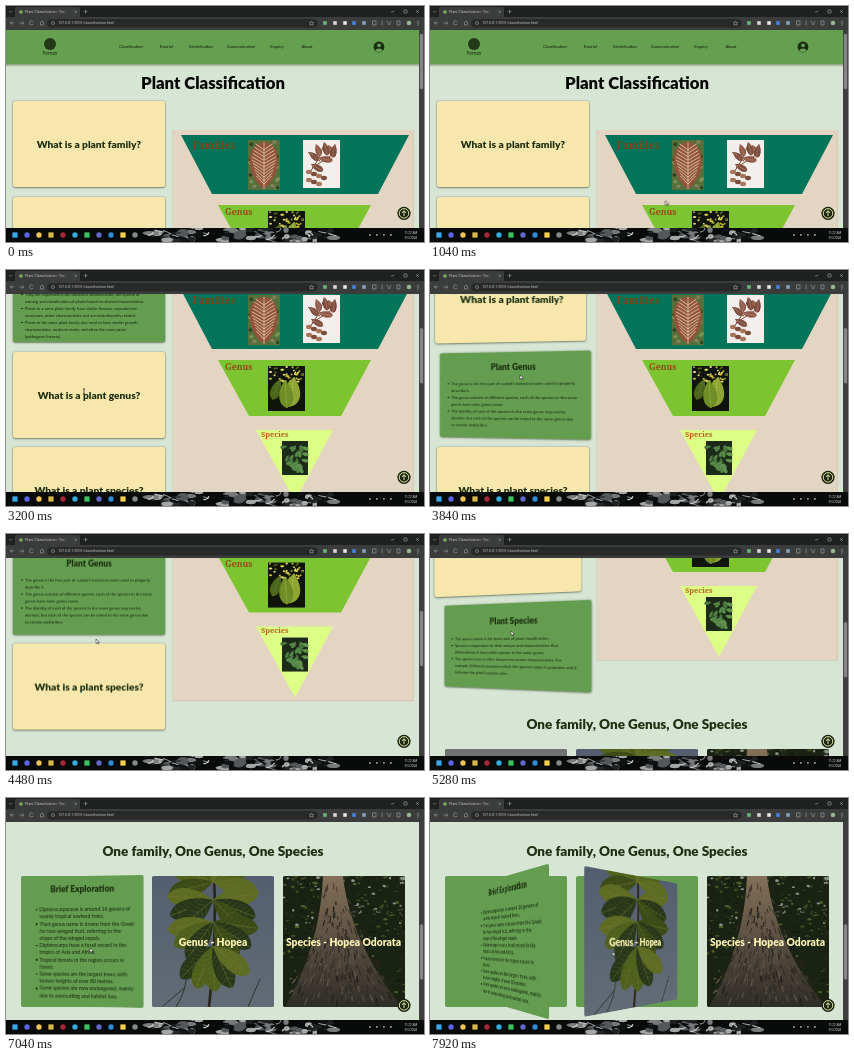
An HTML page that plays this animation: 418 by 236 pixels, repeating every 8000 ms.

```html
<!DOCTYPE html>
<html lang="en">
<head>
<meta charset="utf-8">
<title>Plant Classification</title>
<style>
html, body { margin: 0; width: 100%; height: 100%; overflow: hidden; background: #111; }
#stage { position: relative; width: 418px; height: 236px; overflow: hidden; font-family: Lato, sans-serif; color: #1d3010; }
#stage > svg, #page > svg { position: absolute; left: 0; top: 0; }
#view { position: absolute; left: 0; top: 24px; width: 413px; height: 198px; overflow: hidden; background: #d7e5d4; }
#page { position: absolute; left: 0; top: -24px; width: 413px; height: 720px; }
h1, h2, h3, ul { margin: 0; padding: 0; }
h1, h2 { position: absolute; left: 0; width: 414px; text-align: center; line-height: 20px; white-space: nowrap; font-weight: 900; }
h1 { top: 67px; font-size: 16.7px; color: #050805; }
h2 { top: 397px; font-size: 13.5px; color: #1d3010; }
.card { position: absolute; }
.flip { position: absolute; inset: 0; transform-style: preserve-3d; }
.face { position: absolute; inset: 0; backface-visibility: hidden; border-radius: 2px; overflow: hidden;
  display: flex; flex-direction: column; justify-content: center; align-items: center; white-space: nowrap; }
.back { transform: rotateY(180deg); background: #649d50; }
.info { width: 152px; height: 86px; left: 7px; }
.info .face { box-shadow: 0 .5px 2px #3c4a2c; }
.info .front { background: #f7e7ad; font-weight: 900; font-size: 10.2px; }
.photo { width: 122px; height: 131px; top: 432px; border-radius: 2px; background: #649d50; }
.photo .front svg { position: absolute; inset: 0; }
.photo b { position: relative; font-size: 10.3px; font-weight: 900; color: #fdf5b4; }
h3 { font-size: 8.4px; line-height: 12px; font-weight: 900; margin-bottom: 7.5px; }
ul { align-self: stretch; margin-left: 12px; list-style: none; font-size: 4.1px; line-height: 7px; color: #13250b; }
li { position: relative; }
li::before { content: ""; position: absolute; left: -3.6px; top: 2.8px; width: 1.4px; height: 1.4px; border-radius: 50%; background: #13250b; }
.photo ul { margin-left: 18px; font-size: 5.1px; line-height: 7.2px; }
.photo h3 { font-size: 8.4px; margin-bottom: 11px; }
.slab { font: 900 10px "Noto Serif", serif; }
.ui { font-family: Roboto, sans-serif; }
</style>
</head>
<body>
<div id="stage">
  <div id="view"><div id="page">
    <svg width="413" height="720">
      <defs><linearGradient id="shade" x2="0" y2="1"><stop stop-color="#8b9a80"/><stop offset="1" stop-color="#d7e5d4"/></linearGradient></defs>
      <path fill="#659f50" d="M0 24H413V58H0z"/>
      <path fill="url(#shade)" d="M0 58H413V61H0z"/>
      <circle cx="44" cy="38" r="6" fill="#233a18"/>
      <text x="44" y="49" text-anchor="middle" font-size="5" fill="#1a2c12">Fernzo</text>
      <g id="nav" font-size="4.1" text-anchor="middle" fill="#0f1c0a"></g>
      <circle cx="373" cy="41" r="5.4" fill="#1a2b14"/>
      <circle cx="373" cy="39.3" r="1.9" fill="#659f50"/>
      <path fill="#659f50" d="M369.3 44.8a3.8 3 0 0 1 7.4 0a5.4 5.4 0 0 1-7.4 0z"/>
      <path fill="#c9bfac" d="M166.6 124H407.8V343.6H166.6z"/>
      <path fill="#e3d5c1" d="M167 124H407.4V343H167z"/>
      <path fill="#01745a" d="M175 129H403L372 188H206z"/>
      <path fill="#7cc530" d="M212 199H365L335 255H243z"/>
      <path fill="#ddff86" d="M250 269H327L289 340z"/>
      <g class="slab">
        <text x="186.5" y="143" fill="#784516">Families</text>
        <text x="219" y="209" style="font-size:8.7px" fill="#93491a">Genus</text>
        <text x="255" y="275.7" style="font-size:7.4px" fill="#b85c20">Species</text>
      </g>
      <g id="plants"></g>
    </svg>
    <h1>Plant Classification</h1>
    <h2>One family, One Genus, One Species</h2>
  </div></div>
  <svg id="chrome" width="418" height="236" class="ui">
    <defs><clipPath id="band"><path d="M128 222H336V236H128z"/></clipPath></defs>
    <path fill="#3f3f3f" d="M413 24h5v198h-5z"/>
    <rect id="thumb" x="413.8" y="28" width="3.4" height="55" rx="1" fill="#858585"/>
    <circle cx="398" cy="207.3" r="6.6" fill="#17230f"/>
    <circle cx="398" cy="207.3" r="4.7" fill="none" stroke="#e9e7a4"/>
    <path d="M398 210v-5.2m-2.2 2.2l2.2-2.3l2.2 2.3" fill="none" stroke="#e9e7a4"/>
    <path fill="#1f2020" d="M0 0H418V12H0z"/>
    <path fill="#3b3c3c" d="M0 11H418V24H0zM9 11V3q0-2 2-2H72q2 0 2 2V11z"/>
    <rect x="41" y="13" width="271" height="8.6" rx="4.3" fill="#282929"/>
    <circle cx="15" cy="6" r="1.7" fill="#78b35d"/>
    <g font-size="3.7" fill="#c4c4c4">
      <text x="19" y="7.3">Plant Classification - Fer</text>
      <text x="52" y="18.4">127.0.0.1:5501/classification.html</text>
    </g>
    <g fill="none" stroke="#b4b4b4" stroke-width=".5">
      <path d="M3 5l1.5 1.5L6 5M68.5 4.5l2.5 2.5m0-2.5l-2.5 2.5M79.5 3.7v4m-2-2h4M385 5.7h3.2M398 4h3v3h-3zM410 4l3 3m0-3l-3 3"/>
      <path d="M8.2 17H4.5m1.7-1.8L4.3 17l1.9 1.8M13.5 17h4m-1.7-1.8l1.9 1.8l-1.9 1.8M27 15.6a2 2 0 1 0 .2 2.3M34 17l2-2l2 2m-3.4 0v2h2.8v-2M376 14.5v5"/>
      <circle cx="47" cy="17" r="1.5"/>
      <path d="M305.5 15l.7 1.5l1.5.1l-1.1 1l.4 1.6l-1.5-.8l-1.5.8l.4-1.6l-1.1-1l1.5-.1z"/>
      <path d="M391 15v4h3v-4zM366.5 15h3.5v4h-3.5zM381 15l2 4l2-4"/>
    </g>
    <path fill="#b4b4b4" d="M411.5 15h1v1h-1zm0 1.7h1v1h-1zm0 1.7h1v1h-1z"/>
    <path fill="#090b0b" d="M0 222H418V236H0z"/>
    <g clip-path="url(#band)"><g id="marble" style="filter:blur(.7px)"></g></g>
    <g id="icons"></g>
    <g font-size="3" fill="#dadada" text-anchor="end">
      <text x="411" y="227.6">11:22 AM</text><text x="411" y="232.6">3/5/2024</text>
    </g>
    <g id="mouse">
      <path id="arrow" d="M0 0v4.4l1.1-1l.7 1.6l.8-.4l-.7-1.5h1.5z" fill="#fff" stroke="#111" stroke-width=".5"/>
      <path id="beam" d="M-1-2h2M0-2v5M-1 3h2" fill="none" stroke="#111" stroke-width=".7"/>
    </g>
  </svg>
</div>
<script>
const LOOP = 8000;
const $ = id => document.getElementById(id);

let seed = 11;
const rnd = (a, b) => {
  seed = (seed * 16807) % 2147483647;
  return a + (b - a) * seed / 2147483647;
};
const repeat = (n, make) => Array.from({ length: n }, (_, i) => make(i)).join("");
const pick = list => list[Math.floor(rnd(0, list.length))];
const blob = (x, y, rx, ry, fill) => `<ellipse cx="${x}" cy="${y}" rx="${rx}" ry="${ry}" fill="${fill}"/>`;
const box = (x, y, w, h, fill) => `<rect x="${x}" y="${y}" width="${w}" height="${h}" fill="${fill}"/>`;
const line = (d, stroke, w) => `<path d="${d}" fill="none" stroke="${stroke}" stroke-width="${w}"/>`;
const fade = (id, top, low) => `<linearGradient id="${id}" x2="0" y2="1"><stop stop-color="${top}"/><stop offset="1" stop-color="${low}"/></linearGradient>`;
// Leaves are widest towards the tip
const leaf = (x, y, len, wide, turn, fill, vein) =>
  `<g transform="translate(${x} ${y}) rotate(${turn})"><path d="M0 0C${len * .35} ${-wide} ${len * .85} ${-wide * 1.3} ${len} 0C${len * .85} ${wide * 1.3} ${len * .35} ${wide} 0 0z" fill="${fill}"/>` +
  line(`M0 0H${len}`, vein, .5) +
  repeat(6, i => line(`M${len * (.2 + i * .11)} 0l${len * .1} ${-wide * .6}m0 ${wide * 1.2}l${-len * .1} ${-wide * .6}`, vein, .25)) + "</g>";

// Navigation and pictures in the pyramid
$("nav").innerHTML = [["Classification", 125], ["Tutorial", 160], ["Identification", 195], ["Communication", 235], ["Enquiry", 271], ["About", 301]]
  .map(([s, x]) => `<text x="${x}" y="42.4">${s}</text>`).join("");

const familyLeaf = box(242, 134, 32, 50, "#55703a") +
  repeat(40, () => blob(rnd(244, 272), rnd(136, 182), 2, 1.8, pick(["#3c5a27", "#7c9255", "#8a8060", "#2f4420"]))) +
  `<path d="M257 136C268 135 274 148 271 162Q268 176 258 183Q248 177 245 163C241 149 247 137 257 136z" fill="#94543c"/>` +
  repeat(11, i => {
    const w = 12.5 - Math.abs(i - 4.5) * .9;
    return line(`M${258 - w} ${138 + i * 3.2}L258 ${144 + i * 3.4}L${258 + w} ${138 + i * 3.2}`, "#dcc8a8", .9);
  }) +
  line("M258 136V183", "#e6cfae", .7);
const sketch = box(297, 134, 37, 48, "#f2eeec") +
  line("M302 168Q313 156 318 138M306 162L330 146M314 155L302 146", "#75432f", 1) +
  [[318, 136, 14, 75], [322, 139, 14, 60], [329, 138, 14, 100], [310, 138, 13, 70], [303, 146, 13, 40], [312, 152, 15, 10], [305, 158, 14, 30]]
    .map(([x, y, n, a], i) => leaf(x, y, n, 3.6, a, i % 2 ? "#8a5240" : "#734334", "#b58a76")).join("") +
  repeat(7, i => blob(303 + i % 4 * 5, 166 + i * 2, 3, 2.2, i % 2 ? "#7d4d3b" : "#a6765c"));
const genusLeaf = box(262, 205, 37, 45, "#10130a") +
  repeat(45, () => blob(rnd(264, 297), rnd(206, 221), rnd(.7, 1.8), 1, pick(["#d6c93b", "#a3a52c", "#e8df69", "#596b19"]))) +
  leaf(274, 218, 22, 6, 110, "#46611a", "#6b8430") + leaf(288, 216, 30, 10, 98, "#8ba431", "#b4c054") + leaf(279, 219, 28, 8, 86, "#6d8b24", "#a2b548");
const speciesLeaf = box(276, 280, 26, 34, "#1c2b19") +
  repeat(26, () => leaf(rnd(281, 297), rnd(283, 307), 7, 2.2, rnd(0, 180), pick(["#3f7038", "#598b46", "#2f562d", "#477b3c"]), "#6f9d5c"));
$("plants").innerHTML = familyLeaf + sketch + genusLeaf + speciesLeaf;

// Taskbar
$("marble").innerHTML =
  repeat(75, i => {
    const x = i % 3 ? rnd(215, 330) : rnd(130, 195);
    return blob(x, rnd(222, 236), rnd(2, 8), rnd(1, 4), pick(["#a3a5a6", "#55585a", "#101213", "#1f2223", "#77797a"]));
  }) +
  repeat(26, () => line(`M${rnd(132, 325)} ${rnd(222, 234)}q4 1 ${rnd(3, 10)} ${rnd(-6, 6)}`, pick(["#0a0c0d", "#c4c6c6"]), rnd(.6, 1.6)));
$("icons").innerHTML =
  ["#3aa9ee", "#5965e8", "#f4c552", "#d9b94a", "#a52733", "#34a8df", "#3bc45c", "#6268c5", "#2d8cd6", "#f3d24c", "#85888a"]
    .map((c, i) => i % 3 ? blob(9 + i * 12, 229, 2.7, 2.7, c) : box(6.4 + i * 12, 226.4, 5.2, 5.2, c)).join("") +
  repeat(4, i => box(363 + i * 7, 228, 1.8, 1.8, "#8f9293"));
$("chrome").insertAdjacentHTML("beforeend",
  [[319, "#67b67c"], [329, "#d9d9d9"], [339, "#e6e6e6"], [348, "#4b83df"], [358, "#8aa3bb"]].map(([x, c]) => box(x - 1.8, 15.2, 3.6, 3.6, c)).join("") +
  blob(403, 17, 2.3, 2.3, "#9bb38c"));
$("chrome").append($("mouse"));

// Large photographs, each 122 by 131
const greens = ["#27341a", "#343f1f", "#1e2716", "#434a29", "#2e3b1b"];
const crown = (n, x, y, w, h) => repeat(n, () => {
  const a = rnd(0, 6.283), r = Math.sqrt(rnd(0, 1));
  return blob(x + w * r * Math.cos(a), y + h * r * Math.sin(a), rnd(1, 3), rnd(.7, 1.8), pick(greens));
});
const tree = fade("dusk", "#717274", "#7b7874") + box(0, 0, 122, 131, "url(#dusk)") + box(0, 112, 122, 19, "#5d513d") +
  repeat(40, () => blob(rnd(0, 122), rnd(98, 111), rnd(3, 8), rnd(2, 4), pick(greens))) +
  repeat(24, () => blob(rnd(0, 122), rnd(114, 130), rnd(6, 18), .8, pick(["#6b5d45", "#4e4535", "#625641"]))) +
  `<path d="M54 118Q58 100 57 72L24 46L26 45L58 64L58 28H62L63 60L92 40L93 42L67 70Q67 102 72 118z" fill="#38342c"/>` +
  crown(150, 58, 24, 32, 15) + crown(150, 32, 38, 28, 12) + crown(150, 84, 38, 24, 13) + crown(40, 22, 52, 15, 6);
const hopea = fade("slate", "#535f70", "#626c76") + box(0, 0, 122, 131, "url(#slate)") +
  line("M62 0Q65 60 57 131", "#2a261a", 2.6) + line("M24 131Q36 112 34 96M10 131L32 112M96 131L108 103", "#2c3329", 1) +
  [[6, [200, 165, -25, 12, 250, 285]], [24, [185, 160, 140, -8, 22, 45]], [46, [170, 148, 125, 8, 34, 58]], [70, [135, 112, 88, 66, 38]]]
    .map(([y, turns]) => turns.map((a, i) => leaf(61, y, 46, 11, a, pick(["#3b4a17", "#4f601d", "#28361a", "#5e6c23"]), "#727c35")).join("")).join("");
const trunk = box(0, 0, 122, 131, "#1a2214") + fade("wood", "#857059", "#2f2d28") +
  repeat(420, () => {
    const y = Math.pow(rnd(0, 1), 1.4) * 125;
    return blob(rnd(0, 122), y, rnd(.6, 2.6), rnd(.5, 1.5), pick(["#22301a", "#3a4a22", "#131b10", "#4c5a2b", y < 50 ? "#8b938a" : "#1c2716"]));
  }) +
  `<path d="M40 0H60C64 40 84 88 119 131H2C24 92 38 50 40 0z" fill="url(#wood)"/>` +
  repeat(300, () => {
    const v = Math.sqrt(rnd(0, 1)), u = rnd(-1, 1), half = 10 + 48 * Math.pow(v, 1.3);
    const x = 50 + 10 * v + u * half * .96, y = v * 124;
    return line(`M${x} ${y}l${u * 3.5} ${rnd(3, 8)}`, pick(["#26231f", "#35312b", "#5e564a", "#211f1c"]), rnd(.4, 1.3));
  });

// Cards
const list = items => "<ul>" + items.map(s => `<li>${s.replaceAll("|", "<br>")}</li>`).join("") + "</ul>";
function card(kind, pos, front, title, items) {
  const el = document.createElement("div");
  el.className = "card " + kind;
  el.style.cssText = pos;
  el.innerHTML = `<div class="flip"><div class="face front">${front}</div><div class="face back"><h3>${title}</h3>${list(items)}</div></div>`;
  $("page").append(el);
  return el.firstChild;
}
const photo = (x, art, label, title, items) =>
  card("photo", `left:${x}px`, `<svg width="122" height="131">${art}</svg><b>${label}</b>`, title, items);

const family = card("info", "top:95px", "What is a plant family?", "Plant Family", [
  "Plant families is an essential and basic unit/taxonomic classification in|the plant kingdom.",
  "They are important in the botanical nomenclature, the system of|naming and classification of plants based on shared characteristics.",
  "Plants in a same plant family have similar flowers, reproductive|structures, other characteristics and are evolutionarily related.",
  "Plants in the same plant family also tend to have similar growth|characteristics, nutrient needs, and often the same pests|(pathogens/insects)."]);
const genus = card("info", "top:191px", "What is a plant genus?", "Plant Genus", [
  "The genus is the first part of a plant's botanical name used to properly|describe it.",
  "The genus consists of different species, each of the species in the same|genus have same genus name.",
  "The identity of each of the species in the same genus may not be|obvious, but each of the species can be noted to the same genus due|to certain similarities."]);
const species = card("info", "top:286px", "What is a plant species?", "Plant Species", [
  "The species name is the basic unit of plant classification.",
  "Species is dependent on their unique and characteristics that|differentiates it from other species in the same genus.",
  "The species term is often known for certain characteristics. For|example, <i>Echinacea purpurea</i> which the species name is purpurea and it|indicates the plant's purple color."]);
const photoA = photo(15, tree, "Family - Dipterocarpaceae", "Brief Exploration", [
  "Dipterocarpaceae is around 16 genera of|mainly tropical lowland trees.",
  "Their genus name is drawn from the Greek|for two-winged fruit, referring to the|shape of the winged sepals.",
  "Dipterocarps have a fossil record in the|tropics of Asia and Africa.",
  "Tropical forests in the region occurs in|forest.",
  "Some species are the largest trees, with|known heights of over 80 metres.",
  "Some species are now endangered, mainly|due to overcutting and habitat loss."]);
const photoB = photo(146, hopea, "Genus - Hopea", "Brief Exploration", ["Hopea is a genus of plants in the|family Dipterocarpaceae."]);
photo(276.5, trunk, "Species - Hopea Odorata", "Brief Exploration", ["Hopea odorata is a species of tree."]);

// Motion: each step is [time, value, easing to the next step]
const run = (el, prop, steps, show) => el.animate(
  steps.map(([t, v, easing = "linear"]) => ({ offset: t / LOOP, [prop]: show(v), easing })),
  { duration: LOOP, iterations: Infinity });
const turn = a => `perspective(306px) rotateY(${a}deg)`;
// The opening part of "ease", for turns cut off by the end of the loop
const CUT = "cubic-bezier(.403,.094,.611,.552)";

const flip = (el, on, off) => run(el, "transform",
  [[0, 0], [on, 0, "ease"], [on + 800, 180], [off, 180, "ease"], [off + 800, 0], [LOOP, 0]], turn);
flip(family, 1488, 3248);
flip(genus, 3248, 4768);
flip(species, 4768, 6160);
run(photoA, "transform", [[0, 0], [6400, 0, "ease"], [7200, 180], [7760, 180, CUT], [LOOP, 87.6]], turn);
run(photoB, "transform", [[0, 0], [7788, 0, CUT], [LOOP, 79]], turn);

const scroll = [[0, 0], [2480, 0, "ease-in-out"], [3040, 109], [4160, 109, "ease-in-out"], [4720, 217], [5520, 217, "ease-in-out"], [6120, 354], [LOOP, 354]];
run($("page"), "transform", scroll, y => `translateY(${-y}px)`);
run($("thumb"), "transform", scroll, y => `translateY(${y * .278}px)`);

run($("mouse"), "transform", [[0, [302, 227]], [700, [302, 227], "ease-in-out"], [1600, [79, 119]], [3200, [78, 121], "ease-out"],
  [3700, [90, 105]], [4500, [90, 105], "ease-out"], [5000, [81, 97]], [6120, [81, 97], "ease-in-out"], [6600, [84, 150]],
  [7500, [84, 150], "ease-in"], [7780, [147, 152], "ease-out"], [LOOP, [190, 154]]], ([x, y]) => `translate(${x}px,${y}px)`);
const beam = [[0, 0, "step-end"], [2900, 1, "step-end"], [3300, 0, "step-end"], [LOOP, 0]];
run($("beam"), "opacity", beam, v => v);
run($("arrow"), "opacity", beam, v => 1 - v);
</script>
</body>
</html>
```
